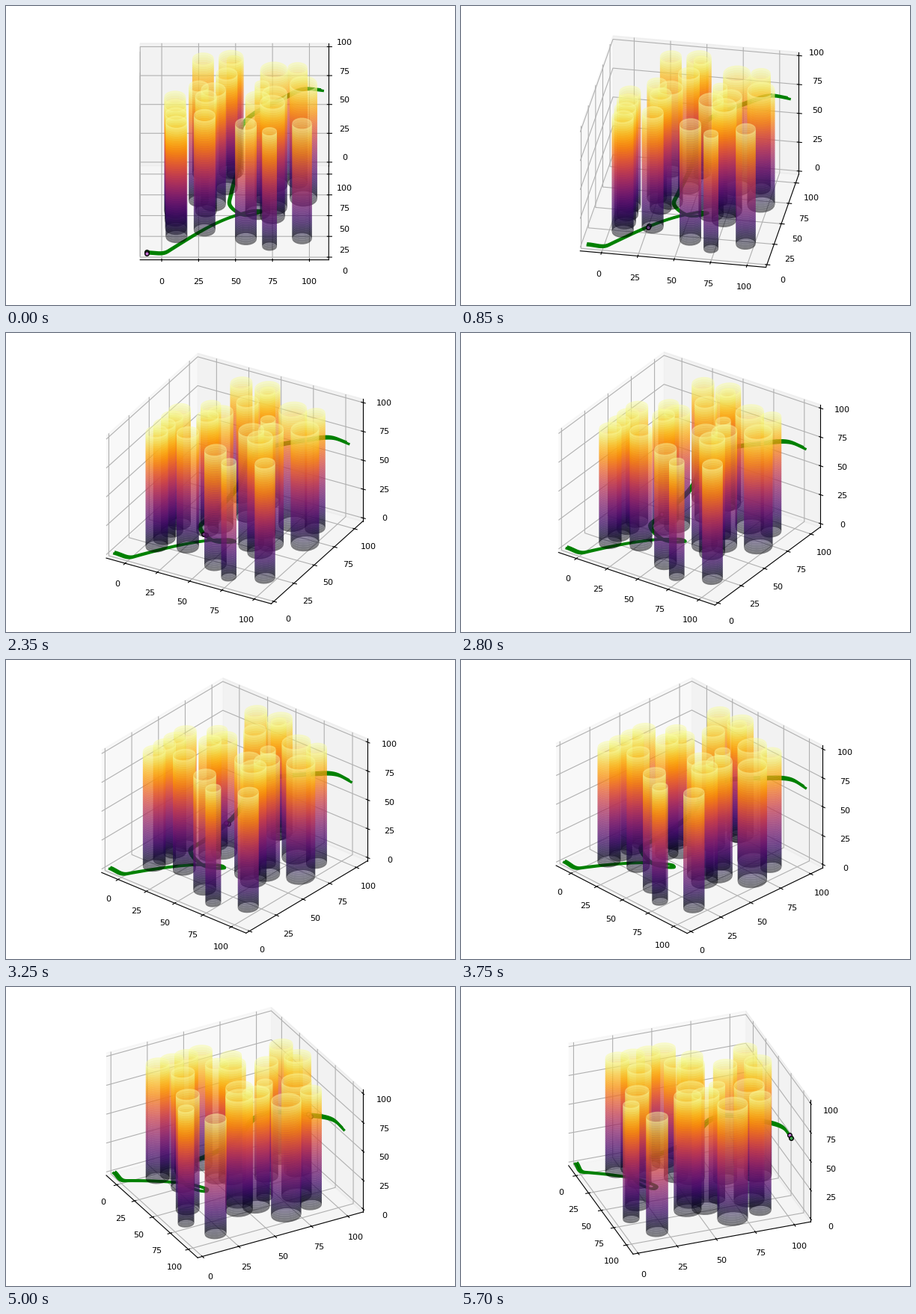
A matplotlib script for the animation above (5750 ms loop, 600 by 400 pixels).

```python
import matplotlib.pyplot as plt
import numpy as np
from matplotlib.animation import FuncAnimation
from matplotlib.collections import PolyCollection

FRAMES, INTERVAL = 115, 50
SWEEP = 70                      # degrees of camera turn per loop
ELEV = np.radians(30)
LIMITS = np.array([(-14.6, 113.1), (-3.2, 110.2), (-3.0, 103.0)])
LEVELS = 50

# pillar centres x + yj, grouped by radius
GROUPS = {
    5.0: [73 + 8.5j, 68 + 65j, 49 + 95j],
    6.7: [95 + 18j, 92 + 85j, 25 + 63j],
    7.3: [57 + 17.5j, 29 + 28j, 30 + 51j, 44 + 78j, 28 + 96j,
          *np.linspace(10 + 20j, 9 + 50j, 4)],
    8.4: [35 + 59j, 65 + 49j, 75 + 44j, 76.5 + 55j, 47 + 98j],
    9.3: [76 + 83j, 96 + 66j],
}
PILLARS = [(c.real, c.imag, r) for r, group in GROUPS.items() for c in group]

# key points of the flight
ROUTE = np.array([
    (-10, 0.3, 0.7), (3.5, 0.3, 1.3), (6, 1.8, 2.2), (51, 27, 14),
    (62, 28, 17), (67.5, 24, 19.5), (57, 17.5, 20.5), (46, 16, 31),
    (47, 26, 33), (53, 53, 46.5), (53, 65, 60), (83, 87, 72.5),
    (98, 98, 72.3), (108, 99, 70.5),
])

fig = plt.figure(figsize=(6, 4), dpi=100, facecolor="white")

# 3D box with panes, grid and ticks
box = fig.add_axes([0, 1 / 96, 1, 47 / 48], projection="3d")
box.set_proj_type("ortho")
box.set(xlim=LIMITS[0], ylim=LIMITS[1], zlim=LIMITS[2])
for axis in (box.xaxis, box.yaxis, box.zaxis):
    axis.set_ticks(range(0, 101, 25))
box.tick_params(labelsize=8, pad=4.3)

# flat layer in pixels for the scene itself
layer = fig.add_axes([0, 0, 1, 1])
layer.set(xlim=(0, 600), ylim=(400, 0))
layer.axis("off")

# orthographic scale of the box in pixels
SIDE = 400 * 47 / 48
EDGE = 1.8294640721620434 * 25 / 24 / np.sqrt(41) / 1.85 * SIDE
SHIFT = (0.95 / 1.85 - 0.5) * SIDE
CX, CY = 300 + SHIFT, 200 - SHIFT
SCALE = EDGE * np.array([4, 4, 3]) / np.ptp(LIMITS, axis=1)
MIDDLE = LIMITS.mean(axis=1)


def project(x, y, z, turn):
    """Return screen x, screen y and nearness."""
    u, v, w = ((p - m) * s for p, m, s in zip((x, y, z), MIDDLE, SCALE))
    c, s = np.cos(turn), np.sin(turn)
    near = u * s - v * c
    return (CX + u * c + v * s,
            CY + near * np.sin(ELEV) - w * np.cos(ELEV),
            near * np.cos(ELEV) + w * np.sin(ELEV))


def lengths(pts):
    """Distance travelled up to each point."""
    return np.append(0, np.cumsum(np.linalg.norm(np.diff(pts, axis=0), axis=1)))


def smooth(pts, count=800):
    """Cubic Hermite curve through the points."""
    knots = lengths(pts)
    slopes = np.gradient(pts, knots, axis=0)
    t = np.linspace(0, knots[-1], count)
    i = np.clip(np.searchsorted(knots, t, side="right") - 1, 0, len(knots) - 2)
    h = (knots[i + 1] - knots[i])[:, None]
    f = (t - knots[i])[:, None] / h
    return ((1 + 2 * f) * (1 - f) ** 2 * pts[i] + f * (1 - f) ** 2 * h * slopes[i]
            + f ** 2 * (3 - 2 * f) * pts[i + 1] + f ** 2 * (f - 1) * h * slopes[i + 1])


core = smooth(ROUTE)
done = lengths(core) / lengths(core)[-1]

# two agents fly side by side, their gap turning along the way
gap = np.outer(1 - done, (0, 0.85, 0.1)) + np.outer(done, (1, 0.3, -0.8))
paths = [core + gap, core - gap]

# slightly quicker at first
progress = np.linspace(0, 1, FRAMES) ** 0.9
agents = [np.column_stack([np.interp(progress, done, c) for c in path.T])
          for path in paths]

core_line, = layer.plot([], [], color="black", lw=1.5, zorder=0)
lines = [layer.plot([], [], color="green", lw=2.4, zorder=0.1)[0] for _ in paths]
dots = [layer.plot([], [], "o", ms=4, mfc=color, mec="black", mew=1)[0]
        for color in ("#3da44e", "#c371d2")]

shades = plt.get_cmap("inferno")((np.arange(LEVELS) + 0.5) / LEVELS)
shades[:, 3] = 0.5
shades = np.vstack([shades, shades])
walls = []
for _ in PILLARS:
    wall = PolyCollection([], facecolors=shades, edgecolors="none", linewidths=0)
    layer.add_collection(wall, autolim=False)
    walls.append(wall)

heights = np.linspace(0, 100, LEVELS + 1)[:, None]
half = np.linspace(0, np.pi, 12)


def strips(x, y, r, turn, start):
    """Horizontal bands of one half of a pillar wall."""
    phi = start + half
    px, py, _ = project(x + r * np.cos(phi), y + r * np.sin(phi), heights, turn)
    ring = np.stack([np.broadcast_to(px, py.shape), py], axis=-1)
    return np.concatenate([ring[:-1], ring[1:, ::-1]], axis=1)


def update(n):
    # the camera moves in whole degrees
    angle = max(round(SWEEP * n / (FRAMES - 1)), 0.01)
    turn = np.radians(angle)
    box.view_init(elev=30, azim=angle - 90)

    # angle of the rightmost silhouette edge
    edge = np.arctan2(SCALE[1] * np.sin(turn), SCALE[0] * np.cos(turn))
    for wall, (x, y, r) in zip(walls, PILLARS):
        wall.set_verts(np.concatenate([strips(x, y, r, turn, edge),
                                       strips(x, y, r, turn, edge - np.pi)]))
        depth = project(x, y, 100, turn)[2] + r * SCALE[0] * np.cos(ELEV)
        wall.set_zorder(1000 + depth)

    for line, path in zip([core_line, *lines], [core, *paths]):
        line.set_data(*project(*path.T, turn)[:2])
    for dot, track in zip(dots, agents):
        px, py, depth = project(*track[n], turn)
        dot.set_data([px], [py])
        dot.set_zorder(1000 + depth)
    return []


anim = FuncAnimation(fig, update, frames=FRAMES, interval=INTERVAL,
                     repeat=True, repeat_delay=0, blit=False)
plt.show()
```
